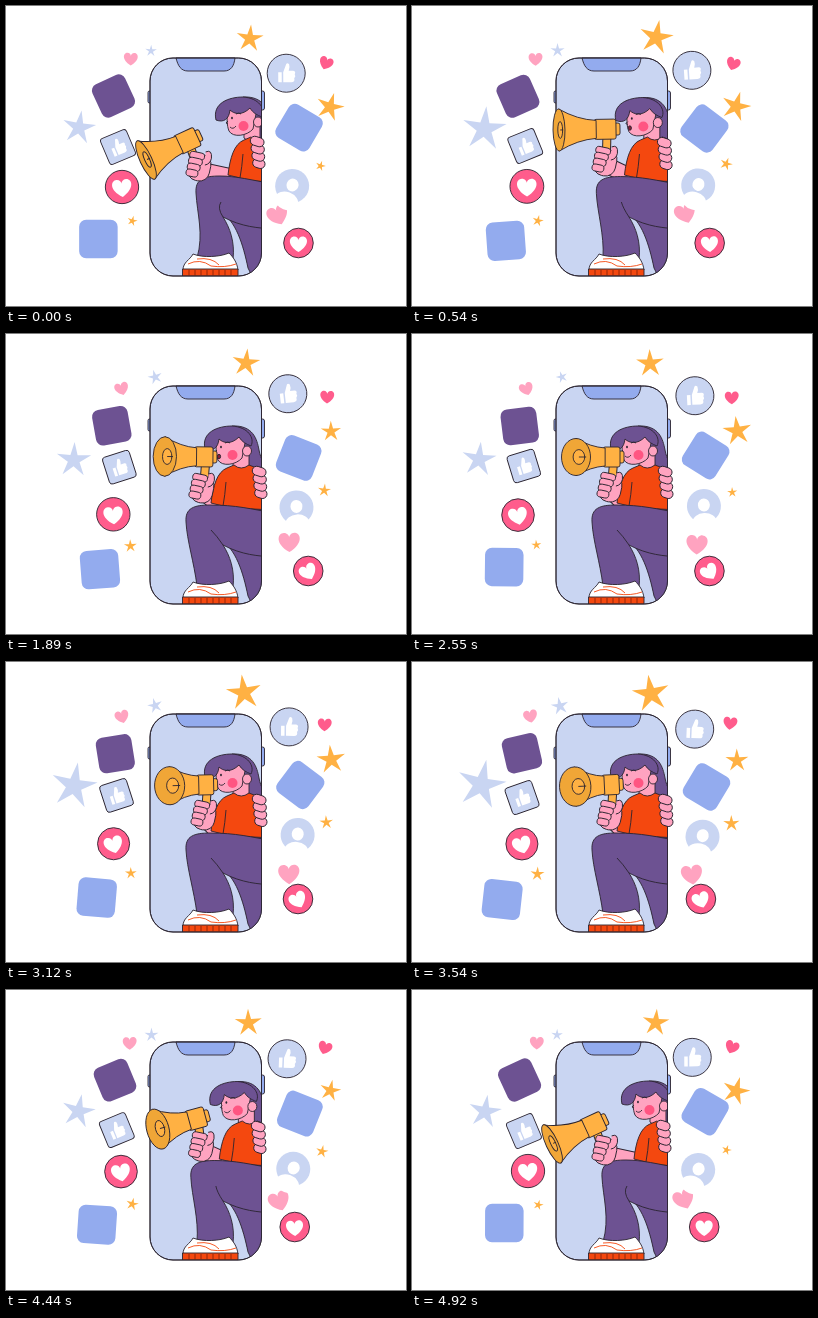
Animation, 400 px wide and 300 px high, one loop 4950 ms. Source, as an HTML page with a canvas:

```html
<!DOCTYPE html>
<html lang="en">
<head>
<meta charset="utf-8">
<title>Phone announcement</title>
<style>
html, body { margin: 0; width: 100%; height: 100%; overflow: hidden; background: #fff; }
canvas { display: block; }
</style>
</head>
<body>
<canvas id="stage" width="400" height="300"></canvas>
<script>
const ctx = document.getElementById('stage').getContext('2d');
const LOOP = 4950, TAU = Math.PI * 2;
const INK = '#2b2430', PALE = '#c9d5f2', BLUE = '#93abee', PURPLE = '#6d5292',
  SKIN = '#ffa3c0', ROSE = '#ff5c8c', RED = '#f4480f', GOLD = '#ffb143', WHITE = '#fff';

const phone = new Path2D();
phone.roundRect(144, 52, 111.5, 218, 23);
const heart = new Path2D('M0 .9C-1.35 .1-1.05-.85-.48-.85C-.18-.85 0-.6 0-.42C0-.6 .18-.85 .48-.85C1.05-.85 1.35 .1 0 .9Z');
const thumb = new Path2D('M-3-1L0-9Q1-11 3-9Q4-6 2.5-2.5L7-2.5Q10-2 8.5 1Q10 3 8 5Q9 9 5 9L-3 9ZM-8-1H-4.5V9H-8Z');

let u = 0; // position in the loop, 0 to 1
const osc = (mean, amp, phase, k = 1) => mean + amp * Math.cos(TAU * (k * u - phase));
const smooth = x => x * x * (3 - 2 * x);
const mix = (a, b, k) => a + (b - a) * k;

function keyed(times, values) {
  const t = u * LOOP;
  let i = 0;
  while (i < times.length - 2 && t > times[i + 1]) i++;
  const k = smooth((t - times[i]) / (times[i + 1] - times[i]));
  return values[i].map((v, j) => mix(v, values[i + 1][j], k));
}

function at(x, y, deg, draw) {
  ctx.save();
  ctx.translate(x, y);
  ctx.rotate(deg * TAU / 360);
  draw();
  ctx.restore();
}

function paint(path, fill, line = INK) {
  const p = typeof path === 'string' ? new Path2D(path) : path;
  if (fill) { ctx.fillStyle = fill; ctx.fill(p); }
  if (line) { ctx.strokeStyle = line; ctx.stroke(p); }
}

function oval(x, y, rx, ry, fill, line = INK) {
  const p = new Path2D();
  p.ellipse(x, y, rx, ry, 0, 0, TAU);
  paint(p, fill, line);
}

function box(x, y, w, h, r, fill, line = INK) {
  const p = new Path2D();
  p.roundRect(x, y, w, h, r);
  paint(p, fill, line);
}

const tile = (x, y, deg, size, fill) =>
  at(x, y, deg, () => box(-size / 2, -size / 2, size, size, 7, fill, null));

function love(x, y, deg, size, fill) {
  at(x, y, deg, () => {
    ctx.scale(size, size);
    paint(heart, fill, null);
  });
}

function loveBadge(x, y, deg, r) {
  oval(x, y, r, r, ROSE);
  love(x, y + 1, deg, r * .6, WHITE);
}

function star(x, y, deg, r, fill) {
  at(x, y, deg, () => {
    ctx.beginPath();
    for (let i = 0; i < 10; i++) {
      const a = i * TAU / 10, d = i % 2 ? r * .34 : r;
      ctx.lineTo(d * Math.sin(a), -d * Math.cos(a));
    }
    ctx.fillStyle = fill;
    ctx.fill();
  });
}

// Thick outlined limb or rod
function rod(x1, y1, x2, y2, width, fill) {
  ctx.save();
  for (const [w, c] of [[width + 2, INK], [width, fill]]) {
    ctx.beginPath();
    ctx.moveTo(x1, y1);
    ctx.lineTo(x2, y2);
    ctx.lineWidth = w;
    ctx.strokeStyle = c;
    ctx.stroke();
  }
  ctx.restore();
}

function drawIcons() {
  star(osc(70, 3, 0), osc(123.7, 2.4, .4), osc(7, 5, .8), osc(21, 4.5, .4, 2), PALE);
  star(osc(147.4, 2.4, .5), osc(44, 1, .95), osc(-8, 10, 0), osc(7.8, 1.7, .5, 2), PALE);
  star(osc(241, 3.2, .08), osc(31, 2, .9), osc(2, 10, .2), osc(16.5, 2.9, .4, 2), GOLD);
  star(osc(324.6, .7, .55), osc(99, 2, 0), osc(5, 12, .05), osc(12.8, 3, .14, 2), GOLD);
  star(osc(317.3, 3.2, .58), osc(159, 3, .8), osc(8, 12, .1), osc(7, 1.7, .5, 2), GOLD);
  star(osc(125.3, 1, .95), osc(213, 2, .05), osc(5, 10, 0), osc(6.5, 1.2, .55, 2), GOLD);

  love(osc(119.6, 5.2, 0), osc(54, 1, .5), osc(-9, 10, 0), 7.2, SKIN);
  love(osc(278.5, 6.5, .5), osc(209.7, 3, .72), osc(-10, 12, .5), 11, SKIN);
  love(osc(320, 1.8, .25), osc(60.5, 3.3, .5), osc(10, 11, 0), 7.2, ROSE);

  tile(osc(107.5, 2.5, .75), osc(91, 1, .5), osc(-16, 9, .52), 36, PURPLE);
  tile(osc(92.4, 2.3, .25), osc(235.4, 2.4, .5, 2), osc(0, 6.5, .75), 38.5, BLUE);
  tile(osc(293.3, 1.2, .72), osc(123.5, 2, .55, 2), osc(29, 8, .22, 2), 38.5, BLUE);

  at(osc(112, 2, .25), osc(136.5, 4.5, 0), osc(-20, 3, .5), () => {
    box(-14, -14, 28, 28, 3, PALE);
    ctx.scale(.85, .85);
    paint(thumb, WHITE, null);
  });
  at(osc(281.5, 1.6, .6), osc(64.3, 4.6, .86), osc(-2, 5, .8), () => {
    oval(0, 0, 19, 19, PALE);
    paint(thumb, WHITE, null);
  });

  at(osc(289, 3, .55), osc(176, 4, .02), osc(9, 13, .93), () => {
    oval(0, 0, 17, 17, PALE, null);
    oval(0, -1, 6, 6.5, WHITE, null);
    oval(0, 16, 12, 9, WHITE, null);
  });

  loveBadge(osc(111, 5, 0), osc(181, 1, .75), osc(-8, 8, .2), osc(16.5, .5, .2));
  loveBadge(osc(295.3, 7.7, .31), 237, osc(-16, 16, 0), 14.8);
}

function drawPhone() {
  box(142, 85, 4, 12, 1.5, BLUE);
  box(253, 85, 5.5, 19, 2, BLUE);
  paint(phone, PALE);
  paint('M170 52H229C228 60 225 65 218 65H182C175 65 172 60 170 52Z', BLUE);
}

function drawHead(talk) {
  paint('M226 92C247 91 251 105 253 116C255 126 258 130 264 138L240 146C230 138 232 120 226 92Z', PURPLE);
  paint('M227 122V133Q234 140 243 133V116Z', SKIN);
  paint('M212 104C209 112 210 121 212 126C216 133 230 131 236 124L240 104C232 96 218 96 212 104Z', SKIN);
  oval(241, 117, 4.5, 5, SKIN);
  oval(226.5, 121, 5, 5, '#ff5582', null);
  paint('M199 115C195 98 212 92 226 92C242 93 249 104 245 112C240 110 236 108 233 103C225 111 217 109 213 105C212 114 207 118 199 115Z', PURPLE);
  oval(215, 113, .9, 1.3, INK, null);
  paint('M219 109Q222 107 224 109M211 116L209 118L211 119', null);
  if (talk > .5) oval(213, 122.5, 1.6, 2.2, '#8d1c37');
  else paint('M213 122Q216 125 219 121', null);
}

function drawLegs(p) {
  const k = mix(190, 180, p), top = mix(170, 171, p);
  paint(`M268 176L226 174L214 205C230 215 237 238 242 262L248 274H268Z`, PURPLE);
  paint(`M268 ${top + 8}C245 ${top + 4} 230 ${top} ${k + 24} ${top}C${k + 8} ${top} ${k - 1} ${top + 3} ${k} ${top + 17}
    C${k + 1} 207 ${k + 8} 228 191 252L227 253C229 236 224 222 217 211C236 221 252 222 268 223Z`, PURPLE);
  paint(`M${k + 25} 196Q211 202 217 211`, null);
  paint('M177 264C177 256 184 254 187 248C197 252 214 251 223 247C227 251 231 256 232 264Z', WHITE);
  paint('M182 258Q194 252 205 260M191 253Q206 251 213 259M205 260Q219 262 230 258', null, RED);
  paint('M176.500 263H232V270H176.500Z', RED);
  for (let x = 183; x < 230; x += 6) paint(`M${x} 264V269.500`, null, '#8c2408');
}

function drawWoman(p, hand, talk) {
  ctx.save();
  ctx.clip(phone);
  at(mix(11, 0, p), mix(-1, 0, p), 0, () => drawHead(talk));
  const shift = mix(17, 0, p);
  rod(hand[0], hand[1] + 6, 214 + shift, 172, 15, SKIN);
  at(shift, 0, 0, () => {
    paint('M205 169C207 152 211 138 221 134L228 131Q235 137 243 131L266 140V184H216L217 172Z', RED);
    paint('M220 148Q219 161 217 172', null);
  });
  drawLegs(p);
  ctx.restore();
  paint(phone, null);
}

function drawMegaphone([ax, ay, rx, ry, bx, by, hx, hy]) {
  const len = Math.hypot(bx - ax, by - ay), deg = Math.atan2(by - ay, bx - ax) * 360 / TAU;
  rod(mix(ax, bx, .8), mix(ay, by, .8) + 4, hx, hy + 10, 7, GOLD);
  at(ax, ay, deg, () => {
    const neck = len * .62;
    box(len - 5, -6, 6, 12, 2, GOLD);
    box(neck - 2, -10, len - neck - 1, 20, 2, GOLD);
    paint(`M0 ${-ry}Q${neck * .5} -10 ${neck} -9V9Q${neck * .5} 10 0 ${ry}Z`, GOLD);
    oval(0, 0, rx, ry, '#f0a637');
    oval(rx * .2, 0, rx * .4, ry * .4, GOLD);
    paint(`M${rx * .2} 0H${rx * .7}`, null);
  });
}

function drawFist(x, y) {
  at(x, y, 12, () => {
    box(-11, -10, 22, 27, 10, SKIN);
    for (let i = 0; i < 4; i++) box(-12, -11 + i * 6, 15 - i, 7, 3.5, SKIN);
    paint('M3-13Q9-17 10-8Q10-2 5 0', SKIN);
  });
}

function drawGrip(p) {
  at(mix(252, 254, p), mix(147, 149, p), 0, () => {
    for (let i = 3; i >= 0; i--) {
      at(-1 + i * .8, -11 + i * 7.4, 18, () => box(-7, -5, 14 - i * .5, 9, 4.5, SKIN));
    }
  });
}

function frame(now) {
  const t = now % LOOP;
  u = t / LOOP;
  const p = smooth(Math.min(1, t / 1000, (LOOP - t) / 1000));
  // horn centre, horn radii, mouthpiece, hand
  const horn = keyed([0, 540, 1260, 2550, 3950, LOOP], [
    [140, 154, 6, 21, 194, 129, 194, 158],
    [147, 124, 6, 21, 207, 123, 194, 153],
    [154, 122, 9, 21, 209, 123, 195, 153],
    [164, 123, 14.5, 18.5, 211, 123, 199, 151],
    [163, 125, 16, 20, 210, 122, 199, 151],
    [140, 154, 6, 21, 194, 129, 194, 158]
  ]);
  const hand = horn.slice(6);
  const talk = t > 400 && t < 2000 ? 1 : 0;

  ctx.fillStyle = WHITE;
  ctx.fillRect(0, 0, 400, 300);
  ctx.lineWidth = .9;
  ctx.lineJoin = 'round';
  drawIcons();
  drawPhone();
  drawWoman(p, hand, talk);
  drawMegaphone(horn);
  drawFist(...hand);
  drawGrip(p);
}

const start = performance.now();
function tick() {
  frame(performance.now() - start);
  requestAnimationFrame(tick);
}
tick();
</script>
</body>
</html>
```
